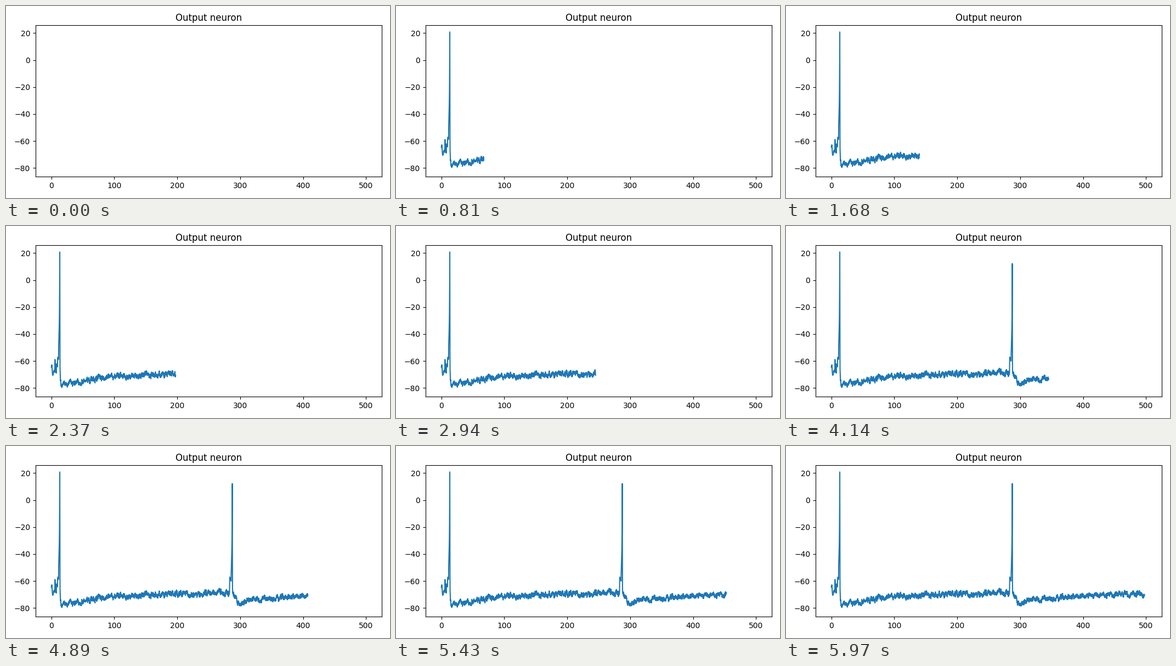
These frames come from a looping animation (700x350 px, 6000 ms). A matplotlib script:

```python
import numpy as np
import matplotlib.pyplot as plt
from matplotlib.animation import FuncAnimation

W, H, DPI = 700, 350, 100
FRAMES, INTERVAL = 200, 30
STEP = 25      # samples revealed per frame
DT = 0.1       # ms of simulated time per sample

# Synaptic kicks leading into each spike
LEAD_A = [(0, -64.5), (0.7, -63), (1.5, -67.5), (4, -67.5), (5.5, -70),
          (5.8, -61.5), (7.9, -70), (8.3, -63.5), (9.7, -64), (9.9, -57),
          (11.5, -58.5)]
LEAD_B = [(283, -67.5), (283.4, -57), (285.6, -60), (285.7, -53)]


def spike(start, peak, v0, top):
    """Accelerating upstroke, then a sudden reset."""
    u = np.linspace(0, 1, 12)
    t = start + (peak - start) * u
    v = v0 + (top - v0) * (0.4 * u + 0.6 * u ** 6)
    return list(zip(t, v)) + [(peak + 0.3, -64), (peak + 0.7, -70)]


def recovery(start, end, v0, rest, tau):
    """Exponential climb from the reset level back to rest."""
    t = np.arange(start, end, 2)
    return list(zip(t, rest + (v0 - rest) * np.exp((start - t) / tau)))


def noise(rng, n, tau, sd):
    """Correlated random fluctuation with time constant tau in ms."""
    rho = np.exp(-DT / tau)
    kicks = rng.normal(0, sd * np.sqrt(1 - rho ** 2), n)
    out = np.zeros(n)
    for i in range(1, n):
        out[i] = rho * out[i - 1] + kicks[i]
    return np.clip(out, -2 * sd, 2 * sd)


def trace():
    n = FRAMES * STEP
    t = np.arange(n) * DT
    points = (LEAD_A + spike(11.6, 13.4, -50, 20.8)
              + recovery(16, 283, -77.7, -68.3, 80)
              + LEAD_B + spike(285.8, 287.4, -53, 12.2)
              + [(289.2, -68), (291, -73), (292, -70.5)]
              + recovery(296, 502, -78, -70, 45))
    v = np.interp(t, *zip(*points))
    rng = np.random.default_rng(7)
    jitter = noise(rng, n, 0.5, 1.0) + noise(rng, n, 2.5, 0.8)
    for lo, hi in ((11.5, 14.2), (283, 288)):
        jitter[(t > lo) & (t < hi)] = 0
    return t, np.maximum(v + jitter, -81.2)


t, v = trace()

fig, ax = plt.subplots(figsize=(W / DPI, H / DPI), dpi=DPI)
ax.set_title("Output neuron")
ax.set_xlim(-24.995, 524.895)
ax.set_ylim(-86.3, 25.8)
line, = ax.plot([], [], color="C0", lw=1.5)
fig.tight_layout()
fig.subplots_adjust(top=1 - 35.1 / H, bottom=1 - 310.9 / H)


def update(k):
    line.set_data(t[:k * STEP], v[:k * STEP])
    return line,


anim = FuncAnimation(fig, update, frames=FRAMES, interval=INTERVAL,
                     repeat=True, repeat_delay=0)
plt.show()
```
